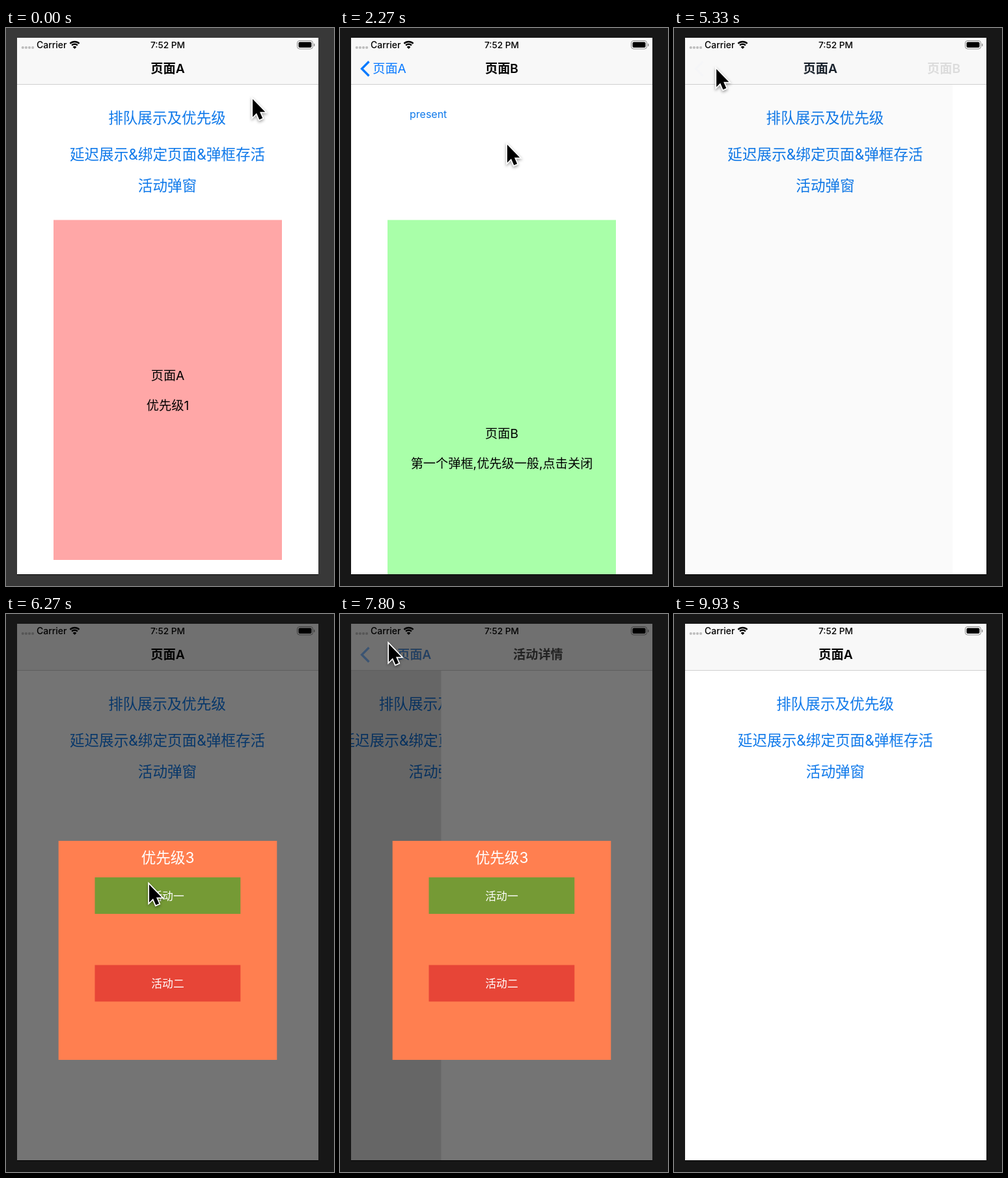
Recreate the animation shown at these times as an HTML page with a canvas. Size 504 px wide and 856 px high, loop 9990 ms.

```html
<!DOCTYPE html>
<html lang="zh-CN">
<head>
<meta charset="utf-8">
<style>
  html, body { margin: 0; width: 100%; height: 100%; overflow: hidden; background: #171717; }
  canvas { display: block; }
</style>
</head>
<body>
<canvas id="stage" width="504" height="856" lang="zh-CN"></canvas>
<script>
const ctx = document.getElementById('stage').getContext('2d');
const LOOP = 9990;
const PHONE = { x: 17, y: 15, w: 463, h: 823 };
const MID = 248.5;
const BLUE = '#0f79ea';
const FONT = 'Inter, "Noto Sans CJK SC", "Noto Sans CJK", sans-serif';

// Cursor tip positions: [time, x, y]
const CURSOR = [
  [0, 379, 109], [250, 372, 150], [850, 262, 552], [1150, 262, 552],
  [1600, 257, 179], [2270, 257, 179], [2540, 262, 560], [2680, 262, 560],
  [3100, 136, 130], [3400, 136, 130], [3950, 106, 82], [4600, 106, 82],
  [4800, 106, 82], [5000, 62, 60], [5300, 62, 60], [5700, 246, 238],
  [5950, 246, 238], [6230, 220, 415], [6600, 220, 415], [7350, 75, 46],
  [7850, 75, 46], [8230, 288, 562], [8450, 288, 562], [8900, 304, 609],
  [9250, 304, 609], [9680, 200, 862]
];

const mix = (a, b, u) => a + (b - a) * u;
function ease(t, start, duration) {
  const u = Math.min(1, Math.max(0, (t - start) / duration));
  return u * u * (3 - 2 * u);
}
const shown = (t, start, end) => ease(t, start, 130) - ease(t, end, 130);

function rect(x, y, w, h, color) {
  ctx.fillStyle = color;
  ctx.fillRect(x, y, w, h);
}

function text(string, x, y, size, color = '#000', weight = 400, align = 'center') {
  ctx.font = `${weight} ${size}px ${FONT}`;
  ctx.textAlign = align;
  ctx.fillStyle = color;
  ctx.fillText(string, x, y + size * 0.38);
}

function withAlpha(alpha, draw) {
  if (alpha <= 0) return;
  ctx.save();
  ctx.globalAlpha *= alpha;
  draw();
  ctx.restore();
}

function shifted(dx, dy, draw) {
  ctx.save();
  ctx.translate(dx, dy);
  draw();
  ctx.restore();
}

const blankPage = () => rect(PHONE.x, PHONE.y, PHONE.w, PHONE.h, '#fff');

function pageA() {
  blankPage();
  text('排队展示及优先级', MID - 1, 137, 22.6, BLUE);
  text('延迟展示&绑定页面&弹框存活', MID - 0.5, 193, 22.6, BLUE);
  text('活动弹窗', MID - 0.5, 241, 22.6, BLUE);
}

function pageB() {
  blankPage();
  text('present', 107, 132, 16, BLUE, 400, 'left');
}

function pageC(pressed) {
  blankPage();
  withAlpha(pressed ? 0.2 : 1, () => text('dismiss', 73, 88, 16, BLUE, 400, 'left'));
}

function navBar(title, pushed) {
  rect(PHONE.x, PHONE.y, PHONE.w, 71, '#f8f8f8');
  rect(PHONE.x, 86, PHONE.w, 1, '#cfcfcf');
  const back = 1 - pushed;
  const labelX = mix(76, MID, Math.pow(back, 1.25));
  withAlpha(back, () => text('页面A', labelX, 62, 19.2, '#000', 600));
  withAlpha(pushed, () => {
    text('页面A', labelX, 62, 19.2, '#0a7aff');
    text(title, MID + 187 * back, 62, 19.2, '#000', 600);
  });
  withAlpha(pushed * pushed, () => {
    ctx.strokeStyle = '#0a7aff';
    ctx.lineWidth = 3.3;
    ctx.beginPath();
    ctx.moveTo(44.5, 51.5);
    ctx.lineTo(33.5, 62.5);
    ctx.lineTo(44.5, 73.5);
    ctx.stroke();
  });
}

// pushed: 0 shows page A, 1 shows the page above it
function navigation(t) {
  const isDetail = t > 5600;
  const pushed = isDetail
    ? ease(t, 6420, 400) - ease(t, 7656, 400)
    : ease(t, 1680, 380) - ease(t, 5030, 380);
  shifted(-0.3 * PHONE.w * pushed, 0, pageA);
  if (pushed > 0) {
    rect(PHONE.x, PHONE.y, PHONE.w, PHONE.h, `rgba(0,0,0,${0.16 * pushed})`);
    shifted(PHONE.w * (1 - pushed), 0, isDetail ? blankPage : pageB);
  }
  navBar(isDetail ? '活动详情' : '页面B', pushed);
}

function statusBar() {
  for (let i = 0; i < 4; i++) {
    ctx.fillStyle = '#bdbdbd';
    ctx.beginPath();
    ctx.arc(25.8 + i * 5.1, 30, 2.1, 0, 7);
    ctx.fill();
  }
  text('Carrier', 47, 26, 14, '#000', 500, 'left');
  text('7:52 PM', MID, 26, 13.7, '#000', 500);

  ctx.strokeStyle = '#000';
  ctx.lineWidth = 2.4;
  for (const radius of [10, 6.2]) {
    ctx.beginPath();
    ctx.arc(105.5, 31, radius, -Math.PI * 0.75, -Math.PI * 0.25);
    ctx.stroke();
  }
  ctx.fillStyle = '#000';
  ctx.beginPath();
  ctx.moveTo(105.5, 32);
  ctx.arc(105.5, 32, 4, -Math.PI * 0.75, -Math.PI * 0.25);
  ctx.fill();

  ctx.strokeStyle = '#8c8c8c';
  ctx.lineWidth = 1;
  ctx.beginPath();
  ctx.roundRect(447.5, 19.5, 24, 12.5, 3.5);
  ctx.stroke();
  ctx.beginPath();
  ctx.roundRect(449.5, 21.5, 20, 8.5, 2);
  ctx.fill();
  rect(473, 24, 1.4, 4, '#8c8c8c');
}

function cardPopup(alpha, color, height, title, message) {
  withAlpha(alpha, () => {
    rect(73, 294.5, 351, height, color);
    const middle = 294.5 + height / 2;
    text(title, MID, middle - 22.5, 19.2);
    text(message, MID, middle + 23, 19.2);
  });
}

function activityPopup(alpha) {
  withAlpha(alpha, () => {
    rect(PHONE.x, PHONE.y, PHONE.w, PHONE.h, 'rgba(0,0,0,0.545)');
    rect(80.7, 348, 335.6, 336, '#ff7f50');
    text('优先级3', MID, 373, 22.6, '#fff');
    rect(136.5, 404, 223.8, 56, '#759a35');
    text('活动一', MID, 432.5, 16.8, '#fff');
    rect(136.5, 538.5, 223.8, 56, '#e74537');
    text('活动二', MID, 567, 16.8, '#fff');
  });
}

function cursor(t) {
  let i = 0;
  while (i < CURSOR.length - 2 && CURSOR[i + 1][0] <= t) i++;
  const [t0, x0, y0] = CURSOR[i], [t1, x1, y1] = CURSOR[i + 1];
  const u = ease(t, t0, t1 - t0);
  shifted(mix(x0, x1, u), mix(y0, y1, u), () => {
    const arrow = new Path2D('M0 0V27.5L6 21.5L10.3 31.5L15.2 29.3L11 19.8H19.2Z');
    ctx.lineJoin = 'miter';
    ctx.lineWidth = 3.4;
    ctx.strokeStyle = '#fff';
    ctx.shadowColor = 'rgba(0,0,0,0.4)';
    ctx.shadowBlur = 4;
    ctx.shadowOffsetY = 2;
    ctx.stroke(arrow);
    ctx.shadowColor = 'transparent';
    ctx.fillStyle = '#000';
    ctx.fill(arrow);
  });
}

function draw(t) {
  rect(0, 0, 504, 856, t < 1400 ? '#383838' : '#171717');
  rect(PHONE.x, 838, PHONE.w, 1, '#000');

  ctx.save();
  ctx.beginPath();
  ctx.rect(PHONE.x, PHONE.y, PHONE.w, PHONE.h);
  ctx.clip();
  navigation(t);
  const presented = ease(t, 3200, 400) - ease(t, 4270, 330);
  if (presented > 0) {
    shifted(0, PHONE.h * (1 - presented), () => pageC(t > 4120 && t < 4270));
  }
  statusBar();

  const notice = '第一个弹框,优先级一般,点击关闭';
  cardPopup(1 - ease(t, 1100, 130), '#ffa7a7', 521.5, '页面A', '优先级1');
  cardPopup(shown(t, 2080, 2640), '#a9ffa9', 700, '页面B', notice);
  cardPopup(shown(t, 4040, 4260), '#d2a8d3', 700, '页面C', notice);
  cardPopup(shown(t, 8480, 9200), '#ffffa9', 521.5, '页面A', '优先级4');
  activityPopup(shown(t, 5820, 6400) + shown(t, 7660, 8300));
  ctx.restore();

  cursor(t);
}

function tick() {
  draw(performance.now() % LOOP);
  requestAnimationFrame(tick);
}
tick();
</script>
</body>
</html>
```
